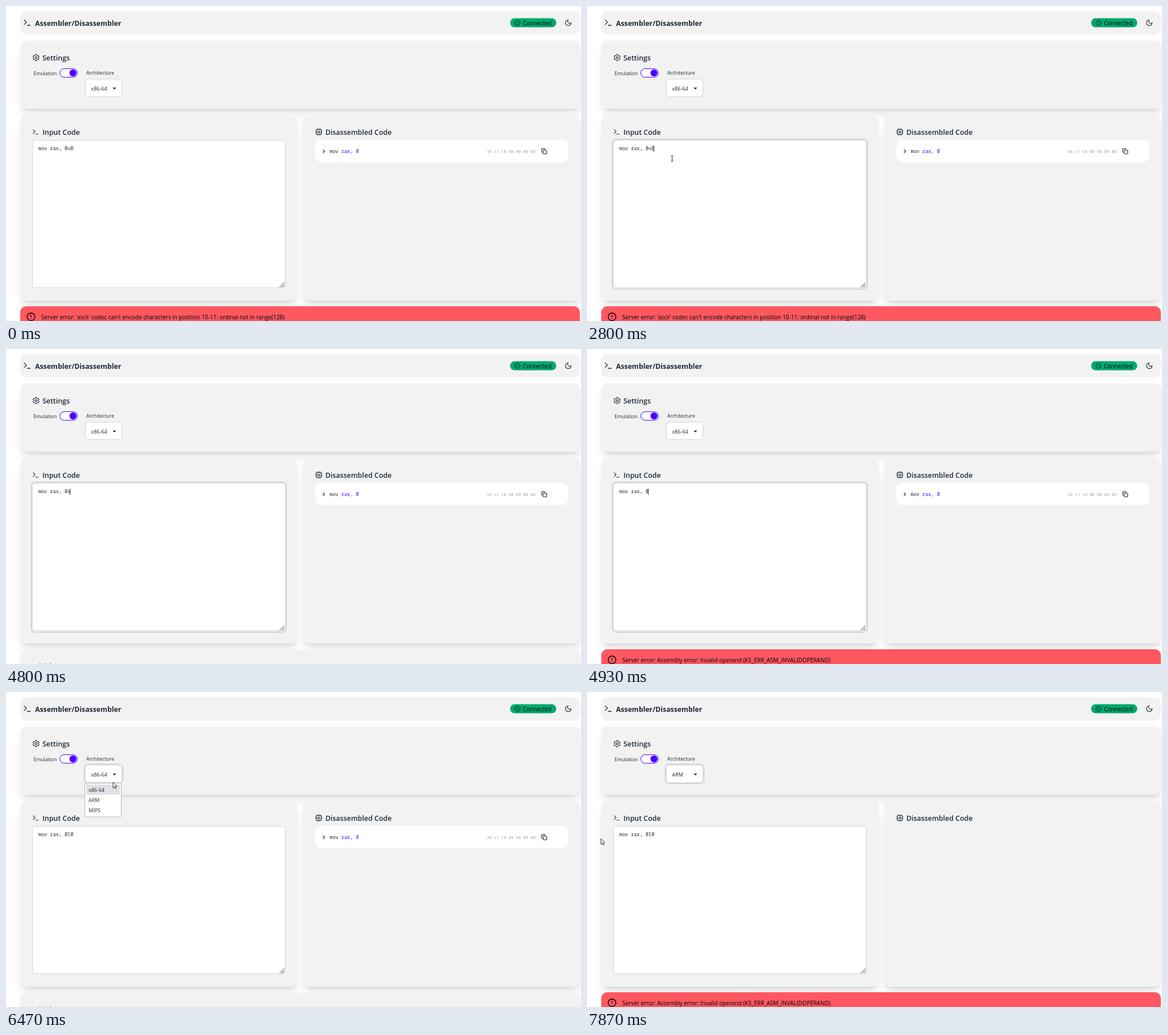
Animation of 1010 by 555 pixels, one loop 8000 ms. Source, as an HTML page:

```html
<!DOCTYPE html>
<html lang="en">
<head>
<meta charset="utf-8">
<title>Assembler/Disassembler</title>
<style>
html, body { margin: 0; width: 100%; height: 100%; overflow: hidden; background: #fff; }
body { position: relative; }
.card {
  position: absolute; left: 25px; width: 984px; border-radius: 10.7px; background: #f2f2f2;
  box-shadow: 0 13.3px 16.7px -3.3px #0000001a, 0 5.3px 6.7px -4px #0000001a;
}
.flat { box-shadow: none; }
#alert { background: #ff5861; box-shadow: none; }
svg { position: absolute; left: 0; top: 0; }
text { font: 10px "Open Sans", "Noto Sans", sans-serif; fill: #1f2937; white-space: pre; }
.title { font-size: 12.25px; font-weight: 700; }
.head { font-size: 12.4px; font-weight: 600; }
.label { font-size: 8.6px; }
.option { font-size: 9px; }
.mono { font: 8.55px "Noto Sans Mono", monospace; }
.hex { font-size: 7.1px; fill: #a3a6ab; }
.black { fill: #000; }
.message { font-size: 9.97px; }
.icon { fill: none; stroke: #1f2937; stroke-width: 2; stroke-linecap: round; stroke-linejoin: round; }
.dark { stroke: #000; }
.bold { stroke-width: 2.6; }
.box { fill: #fff; stroke: #d2d4d7; }
.ring { fill: none; stroke: #b9bbbf; }
</style>
</head>
<body>
<div class="card flat" style="top:9px;height:41px;width:983px"></div>
<div class="card" style="top:61px;height:120px"></div>
<div class="card" style="top:192.5px;height:326px;width:486.5px"></div>
<div class="card" style="top:192.5px;height:326px;left:522px;width:487px"></div>
<div class="card" style="top:529.5px;height:90px"></div>
<div class="card" id="alert" style="top:529px;height:38px;width:983px"></div>

<svg width="1010" height="555" viewBox="0 0 1010 555">
  <defs>
    <path id="prompt" d="M4 17l6-6-6-6M12 19h8"/>
  </defs>

  <use href="#prompt" class="icon" transform="translate(29.3 21.3) scale(.667)"/>
  <text class="title" x="51" y="34.6">Assembler/Disassembler</text>
  <rect x="885.5" y="21.5" width="81" height="16" rx="8" fill="#00a96e"/>
  <path class="icon dark" transform="translate(893.2 24.2) scale(.444)"
    d="M22 11.1V12a10 10 0 1 1-5.9-9.1M22 4 12 14l-3-3"/>
  <text class="black" x="908" y="33.8">Connected</text>
  <path class="icon" transform="translate(981 22.8) scale(.556)" d="M12 3a6 6 0 0 0 9 9 9 9 0 1 1-9-9Z"/>

  <g class="icon" transform="translate(46.2 84.3) scale(.556)">
    <path id="gear"/><circle cx="12" cy="12" r="3"/>
  </g>
  <text class="head" x="64" y="96">Settings</text>
  <text class="label" x="48.5" y="122.3">Emulation</text>
  <rect x="94.5" y="110.5" width="31" height="15" rx="7.5" fill="#fff" stroke="#4a00ff"/>
  <circle cx="117.7" cy="118" r="6.2" fill="#4a00ff"/>
  <text class="label" x="141" y="120.8">Architecture</text>
  <rect class="box" x="139.5" y="129" width="64" height="30.5" rx="5"/>
  <rect class="ring" id="selectRing" x="137.5" y="127" width="68" height="34.5" rx="6.5"/>
  <text class="option" id="arch" x="149.5" y="148.5"></text>
  <path d="M187.3 143.8h6.2l-3.1 3.3z" fill="#1f2937"/>

  <use href="#prompt" class="icon" transform="translate(45.6 215.2) scale(.556)"/>
  <text class="head" x="64" y="227">Input Code</text>
  <rect class="box" x="46.5" y="236.5" width="444" height="260" rx="5"/>
  <rect class="ring" id="inputRing" x="44.5" y="234.5" width="448" height="264.5" rx="6.5"/>
  <path d="M480.5 495.5l8.5-8.5M483.5 495.5l5.5-5.5M486.5 495.5l2.5-2.5" stroke="#555" fill="none"/>
  <text class="mono" id="input" x="56.8" y="254.2"></text>
  <rect id="caret" y="246" width="1" height="11" fill="#1f2937"/>

  <g class="icon" transform="translate(542.8 215.2) scale(.556)">
    <rect x="4" y="4" width="16" height="16" rx="2"/><rect x="9" y="9" width="6" height="6"/>
    <path d="M9 2v2m6-2v2M9 20v2m6-2v2M2 9h2m-2 6h2M20 9h2m-2 6h2"/>
  </g>
  <text class="head" x="561" y="227">Disassembled Code</text>
  <g id="row">
    <rect x="543" y="236" width="444.5" height="39" rx="10.7" fill="#fff"/>
    <path class="icon bold" transform="translate(553 250.7) scale(.444)" d="M9 18l6-6-6-6"/>
    <text class="mono" x="568.6" y="259">mov <tspan id="operand" fill="#4a00ff"></tspan></text>
    <text class="mono hex" id="bytes" x="844.8" y="258.6"></text>
    <g class="icon bold" transform="translate(940 250.7) scale(.444)">
      <rect x="8" y="8" width="14" height="14" rx="2"/>
      <path d="M4 16c-1 0-2-1-2-2V4c0-1 1-2 2-2h10c1 0 2 1 2 2"/>
    </g>
  </g>

  <text class="head" id="nextHead" x="46" y="563.6">Initial State</text>
  <g id="alertBody">
    <path class="icon dark" transform="translate(36 539.7) scale(.667)"
      d="M12 2a10 10 0 1 1-.01 0M12 8v4M12 16h.01"/>
    <text class="black message" id="message" x="62" y="552.2"></text>
  </g>

  <g id="menu">
    <rect x="138.5" y="160.5" width="64" height="59.5" rx="1.5" fill="#fff" stroke="#b4b4bb"/>
    <rect id="hover" x="141" width="59" height="18" fill="#e0e0e6"/>
    <text class="option" x="145" y="175.8">x86-64</text>
    <text class="option" x="145" y="193.9">ARM</text>
    <text class="option" x="145" y="212">MIPS</text>
  </g>

  <path id="arrow" d="M.5.5V10.3L2.7 8.2l1.6 3.5 1.6-.7L4.4 7.6H7.3Z" fill="#fff" stroke="#222" stroke-width=".9"/>
  <path id="beam" d="M-2-5h1.5L0-4.5.5-5H2M0-4.5v9M-2 5h1.5L0 4.5.5 5H2" fill="none" stroke="#222"/>
</svg>

<script>
const LOOP = 8000, FPS = 15;
const $ = id => document.getElementById(id);

// Each track lists [tick, value]; a value holds until the next entry.
const typed = [[0, "0чB"], [49, "0ч"], [51, "0"], [52, "0x"], [55, "0x0"],
  [72, "0x"], [74, "0"], [76, "01"], [77, "010"]];
const ascii = what => `Server error: 'ascii' codec can't encode ${what}: ordinal not in range(128)`;
const invalid = "Server error: Assembly error: Invalid operand (KS_ERR_ASM_INVALIDOPERAND)";
const errors = [[0, ascii("characters in position 10-11")],
  [50, ascii("character '\\u0447' in position 10")],
  [55, ""], [73, invalid], [76, ""], [111, invalid]];
const results = [[0, 0], [77, 1], [78, 8]];
const carets = [[0, false], [41, true], [58, false], [66, true], [83, false], [91, true], [94, false]];

// Pointer strokes: [tick, x, y] points; the last point of a stroke hides the pointer.
const strokes = [
  [[13, 602, 528], [15, 760, 457], [18, 952, 545], [24, 952, 545], [25, 1001, 547], [26]],
  [[31, 514, 190], [33, 340, 152], [36, 215, 225], [40, 149.5, 269], [49]],
  [[86, 147, 262], [88, 118, 193], [90, 138, 165], [94, 178, 148], [96, 186, 154], [98, 189, 163],
   [101, 187, 183], [104, 190, 191], [105, 190, 191], [106, 176, 191], [107, 171, 191],
   [109, 170, 192], [113, 95, 222], [118, 24, 258], [120]],
];

const at = (track, tick) => track.findLast(([start]) => start <= tick)[1];
const show = (id, on) => { $(id).style.display = on ? "" : "none"; };
const between = (tick, from, to) => tick >= from && tick < to;

function pointerAt(tick) {
  const stroke = strokes.find(s => between(tick, s[0][0], s.at(-1)[0]));
  if (!stroke) return null;
  const i = stroke.findLastIndex(p => p[0] <= tick);
  const [t0, x0, y0] = stroke[i];
  const [t1, x1 = x0, y1 = y0] = stroke[i + 1];
  const k = (tick - t0) / (t1 - t0);
  return [x0 + (x1 - x0) * k, y0 + (y1 - y0) * k];
}

function drawGear() {
  const points = Array.from({ length: 72 }, (_, i) => {
    const a = i * Math.PI / 36;
    const r = 8.9 + 1.2 * Math.tanh(2 * Math.cos(6 * a));
    return `${(12 + r * Math.sin(a)).toFixed(2)} ${(12 - r * Math.cos(a)).toFixed(2)}`;
  });
  $("gear").setAttribute("d", `M${points.join("L")}Z`);
}

function render(tick) {
  const code = "mov rax, " + at(typed, tick);
  $("input").textContent = code;
  $("caret").setAttribute("x", Math.floor(56.3 + 5.13 * code.length));
  show("caret", at(carets, tick));
  show("inputRing", between(tick, 41, 94));
  show("selectRing", tick >= 94);
  $("arch").textContent = tick < 109 ? "x86-64" : "ARM";

  const value = at(results, tick);
  $("operand").textContent = "rax, " + value;
  $("bytes").textContent = `48 c7 c0 0${value} 00 00 00`;
  show("row", tick < 111);

  const error = at(errors, tick);
  $("message").textContent = error;
  show("alert", error);
  show("alertBody", error);
  show("nextHead", !error);

  const pointer = pointerAt(tick);
  const menuOpen = between(tick, 95, 109);
  show("menu", menuOpen);
  $("hover").setAttribute("y", pointer && pointer[1] > 181 ? 181 : 163);

  const [x, y] = pointer || [0, 0];
  const overInput = !menuOpen && between(x, 46, 491) && between(y, 236, 497);
  show("arrow", pointer && !overInput);
  show("beam", pointer && overInput);
  for (const id of ["arrow", "beam"]) $(id).setAttribute("transform", `translate(${x} ${y})`);
}

let last = -1;
function loop() {
  // The small lead covers change times that were rounded to 10 ms.
  const tick = Math.floor((performance.now() % LOOP + 5) * FPS / 1000) % (LOOP * FPS / 1000);
  if (tick !== last) render(last = tick);
  requestAnimationFrame(loop);
}

drawGear();
loop();
</script>
</body>
</html>
```
